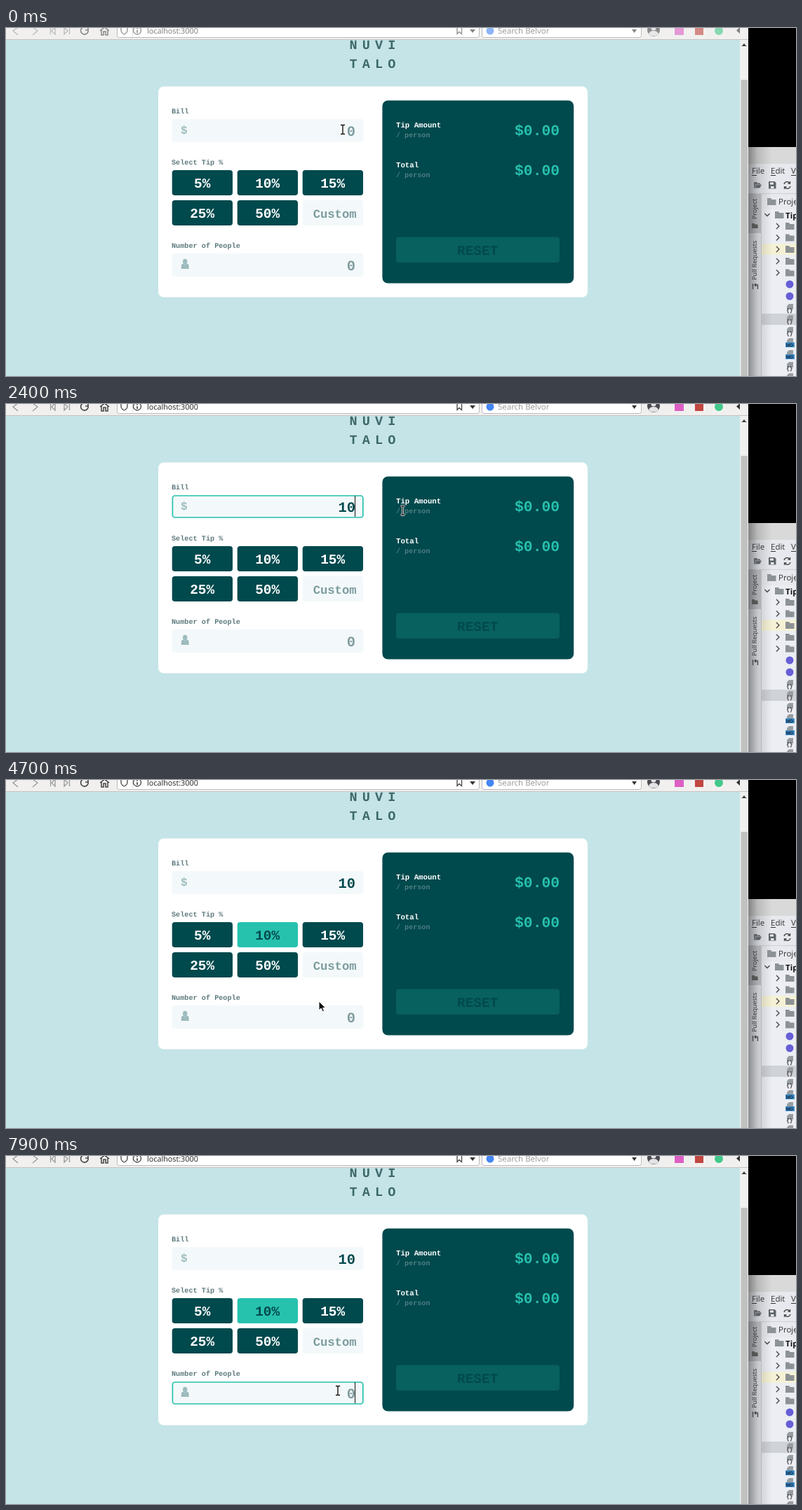
Recreate the animation shown at these times as an HTML page. Size 1126 by 497 pixels, loop 8 s.

```html
<!DOCTYPE html>
<html lang="en">
<head>
<meta charset="utf-8">
<title>Tip calculator</title>
<style>
  html, body { margin: 0; width: 100%; height: 100%; overflow: hidden; background: #c5e4e7; }
  svg { display: block; width: 1126px; height: 497px; }
  text { white-space: pre; text-rendering: geometricPrecision; }
  .mono { font-family: "Liberation Mono", monospace; font-weight: 700; }
  .ui { font: 11.5px "Open Sans", sans-serif; fill: #333; }
  .url { font-size: 10.8px; }
  .label { font-size: 10.2px; fill: #5e7a7d; }
  .per { font-size: 10.1px; fill: #4c7f82; }
  .head { font-size: 10.7px; fill: #fff; }
  .sum { font-size: 21.3px; fill: #26c2ae; text-anchor: end; }
  .value { font-size: 20.4px; text-anchor: end; }
  .btn { font-size: 19.4px; text-anchor: middle; }
  .logo { font-size: 18.5px; letter-spacing: 7.1px; fill: #3d686b; }
  .field { fill: #f3f9fa; }
  .ring { fill: none; stroke: #26c2ae; stroke-width: 1.7; }
  .line { fill: none; stroke: #444; stroke-width: 1.3; }
</style>
</head>
<body>
<svg viewBox="0 0 1126 497">
  <defs>
    <linearGradient id="shade">
      <stop offset="0" stop-opacity=".4"/>
      <stop offset=".4" stop-opacity=".14"/>
      <stop offset="1" stop-opacity="0"/>
    </linearGradient>
  </defs>
  <rect width="1126" height="497" fill="#c5e4e7"/>

  <!-- browser toolbar -->
  <rect width="1058" height="17" fill="#f1f0ef"/>
  <path d="M0 16.5H1058" stroke="#c4c3c2"/>
  <rect x="158.5" y="-12" width="516" height="25.5" rx="3" fill="#fff" stroke="#bbb"/>
  <rect x="678.5" y="-12" width="227" height="25.5" rx="3" fill="#fff" stroke="#bbb"/>
  <path d="M180.5 0V12" stroke="#ddd"/>
  <g id="tools">
    <g class="line">
      <path d="M17-1L10 4l7 6M38-1l7 5-7 6" stroke="#999"/>
      <path d="M63.5-1V9M70-1l-5 5 5 5zM83-1l5 5-5 5zM90.5-1V9" stroke="#999"/>
      <path d="M117 2.5A5.3 5.3 0 1 1 114-1M117-2V3H113" stroke-width="1.6"/>
      <path d="M134 4L140.5-1 147 4M136 3V10H139V5H142V10H145V3" stroke-width="1.5"/>
      <path d="M164-2H173V3Q173 7 168.5 9 164 7 164 3z"/>
      <circle cx="187" cy="3.5" r="5.5"/>
      <path d="M187 3V7M187 0V1.5" stroke-width="1.6"/>
      <path d="M643-2V8.5L646 5.5 649.5 8.5V-2"/>
    </g>
    <path d="M661 2h8l-4 5zM892 2h7l-3.500 5zM1046-1V8L1041 3.500z" fill="#333"/>
    <text class="ui url" x="201" y="8" style="fill:#222">localhost:3000</text>
    <circle cx="690" cy="4" r="5.500" fill="#4285f4"/>
    <circle cx="923" cy="3" r="9" fill="#4a4a50"/>
    <path d="M916 9Q917 4 923 4T930 9Q923 14 916 9z" fill="#e4e4e6"/>
    <circle cx="923" cy="0" r="3.5" fill="#e4e4e6"/>
    <rect x="953" y="-3" width="13" height="13" fill="#dc5fc4"/>
    <rect x="982" y="-3" width="12" height="13" fill="#c0463f"/>
    <circle cx="1016" cy="4" r="6" fill="#42c98a"/>
  </g>
  <text class="ui" x="701" y="8" style="fill:#999">Search Belvor</text>

  <!-- scrollbar -->
  <rect x="1046" y="17" width="12" height="480" fill="#f0f0f0"/>
  <rect x="1047.5" y="74" width="9.5" height="423" fill="#c1c1c1"/>
  <path d="M1048.5 26l3.5-4 3.5 4z" fill="#444"/>

  <!-- editor window behind -->
  <rect x="1058" width="68" height="170" fill="#000"/>
  <rect x="1058" y="170" width="68" height="327" fill="#e7e9ee"/>
  <rect x="1058" y="170" width="68" height="24" fill="#d9d9d9"/>
  <rect x="1058" y="237" width="18" height="56" fill="#c6c9cd"/>
  <rect x="1077" y="259" width="49" height="238" fill="#eceef4"/>
  <rect x="1077" y="308" width="49" height="16" fill="#f4f1d5"/>
  <rect x="1077" y="408" width="49" height="16" fill="#cfd2d7"/>
  <path d="M1058 236.500H1126M1076.500 237V497" stroke="#cdcfd2"/>
  <rect x="1058" y="170" width="34" height="327" fill="url(#shade)"/>
  <text class="ui" x="1063" y="208">File</text>
  <text class="ui" x="1090" y="208">Edit</text>
  <text class="ui" x="1119" y="208">V</text>
  <path d="M1063 210.5h7M1090 210.5h7M1119 210.5h7" stroke="#333"/>
  <path d="M1066 229V220H1070L1071 221.5H1075V223H1069L1066.5 228.5H1074.5L1077 223.5H1069.5L1066.5 229z" fill="#5f6468"/>
  <path d="M1087 219H1095.5L1097.5 221V229.5H1087zM1089 220.5V223.5H1094V220.5zM1090 226V229H1094.5V226z" fill="#5f6468" fill-rule="evenodd"/>
  <path class="line" d="M1109 223a4.5 4.5 0 0 1 8-1.5M1117.5 219v3h-3M1118 226a4.5 4.5 0 0 1-8 1.5M1109.5 230v-3h3" stroke="#5f6468"/>
  <text class="ui" transform="translate(1070 273) rotate(-90)" style="font-size:9px">Project</text>
  <path d="M1063 279h3.5l1 1.5h4v5.5h-8.5z" fill="#555"/>
  <text class="ui" transform="translate(1070 360) rotate(-90)" style="font-size:9px">Pull Requests</text>
  <path class="line" d="M1064.5 365v8M1071.5 373v-6h-4M1069 365l-2 2 2 2"/>
  <text class="ui" x="1101" y="252">Proje</text>
  <text class="ui" x="1111" y="271.5" style="font-weight:700;fill:#111">Tip</text>
  <path class="line" d="M1081.5 265l3.5 3.5 3.5-3.5" stroke="#777"/>
  <g id="tree"></g>

  <!-- calculator -->
  <text class="mono logo" x="489.600" y="30">NUVI</text>
  <text class="mono logo" x="489.600" y="57">TALO</text>
  <rect x="217" y="83.5" width="612" height="301" rx="8" fill="#fff"/>
  <rect x="536.400" y="103.500" width="272.800" height="261" rx="8" fill="#00494d"/>
  <g class="mono">
    <text class="label" x="236" y="122">Bill</text>
    <text class="label" x="236" y="194.500">Select Tip %</text>
    <text class="label" x="236" y="313.500">Number of People</text>
    <rect class="field" x="236.500" y="130" width="273" height="33" rx="4"/>
    <rect class="field" x="236.500" y="322" width="273" height="33" rx="4"/>
    <rect class="field" x="422.700" y="246" width="86.300" height="36" rx="4"/>
    <rect class="ring" id="billRing" x="237.400" y="131" width="271.400" height="31" rx="3.500"/>
    <rect class="ring" id="peopleRing" x="237.400" y="323" width="271.400" height="31" rx="3.500"/>
    <text x="249" y="150.500" style="font-size:16px" fill="#9ebbbd">$</text>
    <g fill="#9ebbbd">
      <ellipse cx="255.200" cy="333.500" rx="3.200" ry="3.700"/>
      <path d="M249.800 344V340Q249.800 336.500 253 336.500 255.200 338.500 257.500 336.500 260.700 336.500 260.700 340V344z"/>
    </g>
    <text class="value" id="bill" x="498" y="153.500"></text>
    <text class="value" id="people" x="498" y="345.500"></text>
    <g id="buttons"></g>
    <text x="468.600" y="270.500" text-anchor="middle" style="font-size:17.200px" fill="#7f9c9f">Custom</text>
    <text class="head" x="556" y="141.500">Tip Amount</text>
    <text class="per" x="556" y="156">/ person</text>
    <text class="head" x="556" y="198.500">Total</text>
    <text class="per" x="556" y="213">/ person</text>
    <text class="sum" id="tip" x="789" y="153"></text>
    <text class="sum" id="total" x="789" y="209.500"></text>
    <rect id="reset" x="556" y="298.500" width="233" height="36.500" rx="4"/>
    <text class="btn" id="resetText" x="672.200" y="324">RESET</text>
  </g>
  <rect id="caret" x="497" width="1" height="30" fill="#111"/>

  <!-- pointers, drawn around their hot spot -->
  <g id="beam" fill="none">
    <path d="M-3-6.500H-1Q0-6.500 0-5.500 0-6.500 1-6.500H3M0-5.500V5.500M-3 6.500H-1Q0 6.500 0 5.500 0 6.500 1 6.500H3" stroke="#fff" stroke-width="3"/>
    <path d="M-3-6.500H-1Q0-6.500 0-5.500 0-6.500 1-6.500H3M0-5.500V5.500M-3 6.500H-1Q0 6.500 0 5.500 0 6.500 1 6.500H3" stroke="#111" stroke-width="1.400"/>
  </g>
  <path id="hand" d="M-2.500-5Q-1.500-7-.5-5V-1L1-1.500 2.500-1 4-.5 6 .5V4L4.500 7H-1.500L-5.500 2Q-6 0-4 .5L-2.500 2z" fill="#fff" stroke="#111" stroke-width="1.200" stroke-linejoin="round"/>
  <path id="arrow" d="M0 0V13L3 10 5.500 15 7.500 14 5.500 9.500H9.500z" fill="#111" stroke="#fff"/>
</svg>
<script>
const $ = id => document.getElementById(id);
const DARK = '#00494d', GREEN = '#26c2ae', LIGHT = '#8ce4d6', FAINT = '#7f9c9f';
const LOOP = 8000;

// Tip buttons
const tips = ['5%', '10%', '15%', '25%', '50%'];
$('buttons').innerHTML = tips.map((tip, i) => {
  const x = 236.7 + (i % 3) * 93, y = i < 3 ? 203 : 246;
  return `<rect id="b${i}" x="${x}" y="${y}" width="86.3" height="36" rx="4" fill="${DARK}"/>` +
    `<text id="t${i}" class="btn" x="${x + 43}" y="${y + 25}" fill="#fff">${tip}</text>`;
}).join('');

// File tree
const folder = (x, y) => `<path d="M${x} ${y - 5}h5l1.5 2h6v8h-12.5z" fill="#8d9296"/>`;
const chevron = y => `<path class="line" d="M1098 ${y - 4}l4 4-4 4" stroke="#777"/>`;
const file = y => `<path d="M1116 ${y - 6}h6v8h-9v-5z" fill="#989da2"/>` +
  `<text x="1112" y="${y + 6}" fill="#444" style="font:700 8px 'DejaVu Sans Mono',monospace">{}</text>`;
const markdown = y => `<path d="M1116 ${y - 6}h6v6h-9v-3z" fill="#989da2"/>` +
  `<rect x="1111" y="${y}" width="13" height="7" fill="#3f8fc4"/>` +
  `<text x="1112" y="${y + 6}" fill="#124" style="font:700 6.5px 'Liberation Sans',sans-serif">MD</text>`;
const dot = y => `<circle cx="1117" cy="${y}" r="5.5" fill="#665fd6"/>`;
$('tree').innerHTML = folder(1085, 248) + folder(1096, 267) +
  [283, 299.5, 316, 333, 349.5].map(y => chevron(y) + folder(1111, y)).join('') +
  [366, 383].map(dot).join('') +
  [400, 416, 433, 483, 499].map(file).join('') +
  [449, 466].map(markdown).join('');

// Each step changes part of the state from its time on.
const steps = [
  [0, { active: 0, at: ['beam', 480, 145], caret: '', billRing: 0, peopleRing: 0, bill: '', people: '',
        tip: '$0.00', total: '$0.00', reset: 0, button: DARK }],
  [200, { at: ['beam', 481, 145] }],
  [400, { active: 1, billRing: .6, caret: 'bill' }],
  [500, { billRing: 1 }],
  [700, { at: ['arrow', 590, 120] }],
  [800, { at: ['arrow', 631, 115] }],
  [1000, { caret: '' }],
  [1600, { bill: '1', caret: 'bill' }],
  [1900, { bill: '10' }],
  [2300, { at: ['arrow', 600, 132] }],
  [2400, { at: ['beam', 565.5, 152] }],
  [3000, { at: ['hand', 402, 222], caret: '', button: '#4c9d97' }],
  [3100, { at: ['hand', 380, 226], button: LIGHT }],
  [3500, { billRing: .6 }],
  [3600, { billRing: .25 }],
  [3700, { billRing: 0 }],
  [4200, { at: ['hand', 379, 230] }],
  [4300, { at: ['hand', 378, 235] }],
  [4400, { at: ['hand', 377, 239] }],
  [4500, { at: ['arrow', 434, 305], button: '#4ccfbd' }],
  [4700, { at: ['arrow', 446, 316], button: GREEN }],
  [4800, { at: ['beam', 456, 330] }],
  [4900, { at: ['beam', 464, 337] }],
  [5000, { at: ['beam', 467.5, 340] }],
  [5200, { peopleRing: .95, caret: 'people' }],
  [5300, { peopleRing: 1 }],
  [5700, { caret: '' }],
  [6300, { people: '2', caret: 'people', tip: '$0.50', total: '$5.00' }],
  [6500, { reset: 1 }],
  [6900, { at: ['beam', 470, 338] }],
  [7000, { at: ['beam', 473, 335] }],
  [7100, { caret: '' }],
  [7600, { caret: 'people' }],
  [7900, { people: '', tip: '$0.00', total: '$0.00', reset: 0 }]
];

const set = (id, name, value) => $(id).setAttribute(name, value);

function field(id, value) {
  $(id).textContent = value || '0';
  set(id, 'fill', value ? DARK : FAINT);
}

function draw(s) {
  set('tools', 'opacity', s.active ? 1 : .6);
  field('bill', s.bill);
  field('people', s.people);
  for (const id of ['billRing', 'peopleRing']) set(id, 'opacity', s[id]);
  for (const id of ['tip', 'total']) $(id).textContent = s[id];
  set('b1', 'fill', s.button);
  set('t1', 'fill', s.button === DARK ? '#fff' : DARK);
  set('reset', 'fill', s.reset ? GREEN : '#08605f');
  set('resetText', 'fill', DARK);
  set('caret', 'opacity', s.caret ? 1 : 0);
  set('caret', 'y', s.caret === 'people' ? 323 : 131);
  const [shape, x, y] = s.at;
  for (const id of ['beam', 'hand', 'arrow']) set(id, 'visibility', id === shape ? 'visible' : 'hidden');
  set(shape, 'transform', `translate(${x} ${y})`);
}

const start = performance.now();
let last = -1;
function tick(now) {
  const t = Math.max(0, now - start) % LOOP;
  const past = steps.filter(step => step[0] <= t);
  if (past.length !== last) {
    last = past.length;
    draw(Object.assign({}, ...past.map(step => step[1])));
  }
  requestAnimationFrame(tick);
}
tick(start);
</script>
</body>
</html>
```
